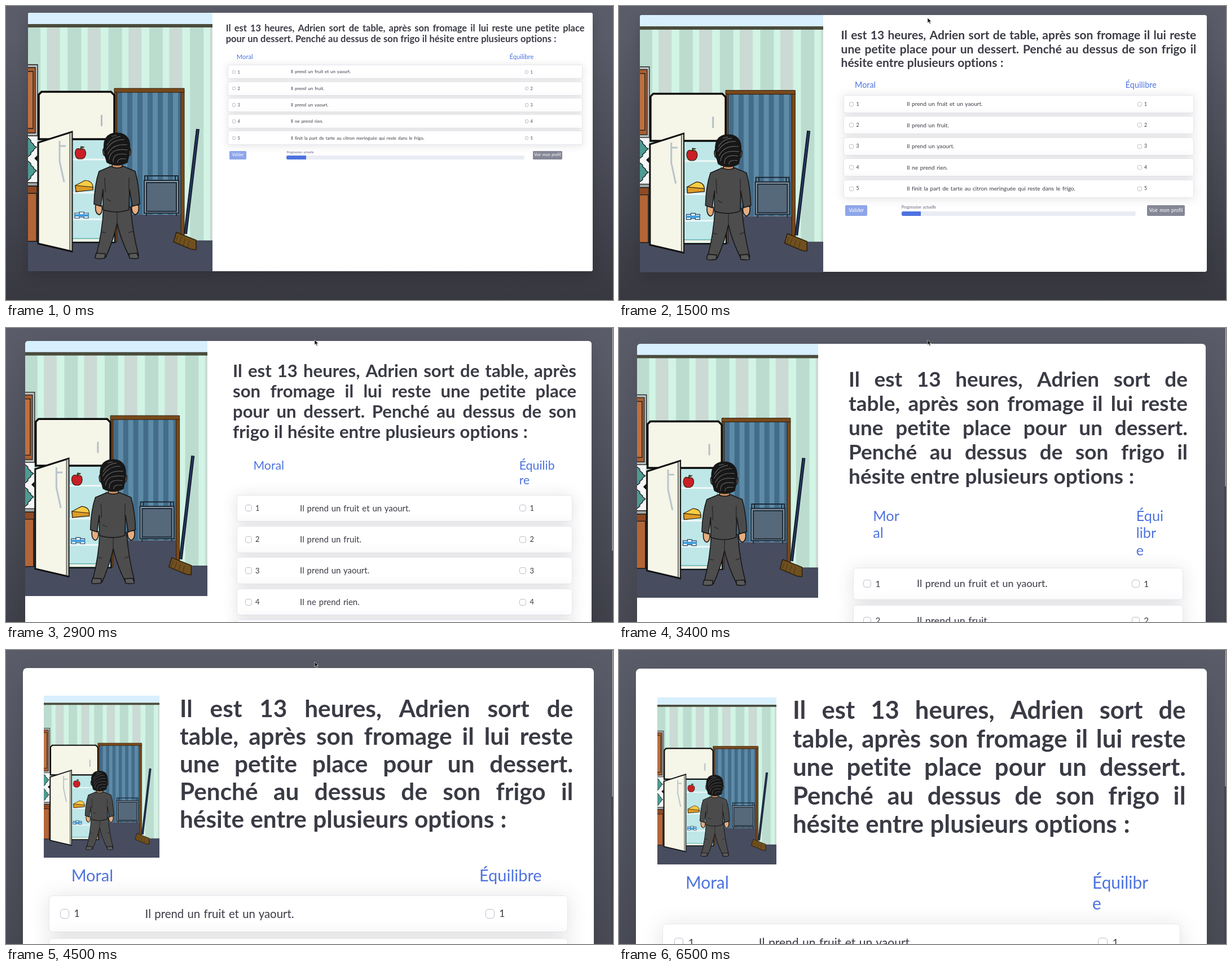
Recreate the animation shown at these times as an HTML page. Size 1076 by 521 pixels, loop 7.6 s.

```html
<!DOCTYPE html>
<html lang="fr">
<head>
<meta charset="utf-8">
<title>Quiz</title>
<style>
html, body { margin: 0; width: 100%; height: 100%; overflow: hidden; }
#stage { position: relative; width: 1076px; height: 521px; overflow: hidden; background: #373840;
  font-family: Lato, "Open Sans", sans-serif; font-variant-ligatures: none; color: #3a3b45; word-spacing: .065em; }
#stage div, #stage svg { position: absolute; box-sizing: border-box; }
.back { background: linear-gradient(#5a5c69 10%, #373840); }
.track { background: #46464e; }
.thumb { background: #929297; border-radius: 2px; }
.card { background: #fff; border-radius: .35em; box-shadow: 0 1em 3em rgba(0,0,0,.175); }
.scene { border-radius: .35em 0 0 0; overflow: hidden; }
.line { font-size: 2.075em; font-weight: 700; display: flex; justify-content: space-between;
  align-items: center; gap: .2em; line-height: 1; margin-top: -.058em; white-space: nowrap; }
.line.last { justify-content: flex-start; gap: .265em; }
.mid { line-height: 0; white-space: nowrap; margin-top: -.05em; }
.head { font-size: 1.42em; color: #4e73df; }
.row { background: #fff; border: .0625em solid #e6e8f0; border-radius: .3em;
  box-shadow: 0 .15em 1.75em rgba(58,59,69,.15); }
.check { border: max(.065em, .7px) solid #bcbdc9; border-radius: .25em; background: #fff; }
.num { font-size: .86em; }
.opt { font-size: 1em; }
.small { font-size: .665em; font-weight: 700; color: #858796; }
.bar { background: #eaecf4; border-radius: .3em; overflow: hidden; }
.fill { background: #4e73df; }
.btn { border-radius: .2em; color: #fff; display: flex; align-items: center; justify-content: center; text-align: center; }
.btn span { font-size: .875em; line-height: 1.4; margin-top: -.06em; }
.ok { background: #8ea5ea; }
.profile { background: #858796; }
.alert { background: #fadbd8; border: 1px solid #f3c4c0; border-radius: 7px; }
.warn { color: #78261f; font-size: 27.3px; }
.warn.big { font-size: 37.6px; font-weight: 700; }
</style>
</head>
<body>
<svg width="0" height="0" style="position:absolute">
<defs>
  <pattern id="wall" x="-2" width="72.3" height="9" patternUnits="userSpaceOnUse">
    <path fill="#d1f4e5" d="M0 0h73v9H0z"/><path fill="#bbdccf" d="M0 0h24v9H0z"/><path fill="#cbdad4" d="M35.5 0h23v9h-23z"/>
  </pattern>
  <pattern id="blue" x="158" width="18" height="9" patternUnits="userSpaceOnUse">
    <path fill="#5d8ba8" d="M0 0h18v9H0z"/><path fill="#436c89" d="M0 0h9v9H0z"/>
  </pattern>
  <symbol id="kitchen" viewBox="0 0 327 458" preserveAspectRatio="none">
    <path fill="#d8effd" d="M0 0h327v21H0z"/>
    <path fill="url(#wall)" d="M0 25h327v380H0z"/>
    <path fill="#4a4c3c" d="M0 20h327v6H0z"/>
    <path fill="#474c5f" d="M0 404h327v54H0z"/>
    <path stroke="#343849" d="M276 404h51"/>
    <!-- doorway -->
    <path fill="url(#blue)" d="M156 140h116v218H156z"/>
    <path fill="#474c5f" d="M154 358h118v50H154z"/>
    <g fill="#78491b" stroke="#2e1d0a"><path d="M271 140h6v265h-6zM153.500 140h4v266h-4z"/><path d="M153 134h124v7H153z"/></g>
    <g fill="none" stroke="#1c2936" stroke-width="2"><path d="M207 289h59v10h-59zM212 289v10M261 289v10"/>
      <path fill="#8b9aa6" d="M206 297h61v58h-61z"/><path fill="#56697a" d="M210 301h53v51h-53z"/><path d="M210 355v5M263 355v5"/></g>
    <!-- broom -->
    <path d="M301 206 279 392" stroke="#0e1422" stroke-width="6"/><path d="M301 207 279 392" stroke="#25365d" stroke-width="3"/>
    <path fill="#70501f" stroke="#2b1e0a" stroke-width="1.500" d="m263 389 35 14 0 17-9-1-31-13z"/>
    <path fill="none" stroke="#4a3410" d="m266 395-4 11m10-9-4 12m11-9-4 13m11-10-3 12"/>
    <!-- cupboards -->
    <path fill="#f4f6f5" d="M0 218h16v84H0z"/>
    <g stroke="#16191a" stroke-width="1.300"><path fill="#4d9b92" d="M-2 222h2l5 4v3l5 4v2l5 3-5 4v2l-5 4v3l-5 4h-2zM-2 263h2l5 4v3l5 4v2l5 4-5 4v2l-5 4v3l-5 4h-2z"/>
      <path d="M16 254l-4 4 4 4z"/>
      <path fill="#b9bcb9" d="M-2 92h19v126H-2z"/><path fill="#a95e31" d="M-2 97h15v116H-2z"/><path fill="#bd7040" d="M-2 104h11v101H-2z"/>
      <path fill="#8d4b25" d="M-2 307h18v98H-2z"/><path fill="#b36537" d="M-2 320h17v85H-2z"/><path fill="#a0a6a6" d="M-2 301h19v6H-2z"/></g>
    <!-- fridge -->
    <path fill="#bfe7e8" stroke="#111" stroke-width="2.500" d="M70 222h84v185H70z"/>
    <path fill="none" stroke="#f3f3e4" stroke-width="4" d="M148 227v176H78"/><path stroke="#3a9d98" d="M145 228v172H78" fill="none"/>
    <path stroke="#eef7f8" stroke-width="3" d="M78 260h67M78 319h67M78 366h67"/>
    <path fill="#f5f5e8" stroke="#0c0c0c" stroke-width="3.500" d="M24 140h123l6 6v78H19v-79z"/>
    <path stroke="#b4bec5" stroke-width="3" d="M130.500 181v20"/>
    <path fill="#f5f5e8" stroke="#111" stroke-width="3" d="M18 230 78 211V423L18 409z"/>
    <path fill="#c9cbbb" stroke="#222" d="M74 213l4-1v210l-4-1z"/>
    <path fill="none" stroke="#b9c4ca" stroke-width="3" d="M56 227v36l8 37M56 236h11"/>
    <g stroke="#321" stroke-width="1.200">
      <path fill="#c91f26" d="M93 242c-12-7-12 16-3 17h6c9-2 9-22-3-17z"/><path fill="#4b9b34" d="m93 241 1-4 5 1z"/>
      <path fill="#f8cc45" d="m84 306 17-9q13 1 14 11v5l-30 4z"/><path fill="#dd9c27" d="m84 306 31 3v5l-30 3z"/>
      <g fill="#eef8ff" stroke="#246"><path d="M83 355h8v9h-8zM91 353h8v9h-8zM99 355h8v9h-8z"/></g>
    </g>
    <path stroke="#3c9ce0" stroke-width="4" d="M83 359h24"/>
    <!-- man seen from behind -->
    <g stroke="#171717" stroke-width="1.600" stroke-linejoin="round">
      <path fill="#e5ad80" d="M120 340q-2 15 6 18 7-3 5-16zM184 340q-2 14 6 18 8-3 6-17z"/>
      <path fill="#4d4d4d" d="M134 344Q132 388 121 430l17 3q14-32 20-60 6 28 22 60l16-3q-11-42-14-86z"/>
      <path fill="#5a5a5a" d="m121 426-2 8q2 3 17 1l1-8zM179 427l1 8q14 2 16-1l-3-8z"/>
      <path fill="#4b4b4b" d="M147 272q10 4 22 0l21 9q7 25 8 58l-13 4-5-30-1 36q-22 8-46 0v-36l-4 30-12-4q1-35 9-58z"/>
      <path fill="none" stroke="#2d2d2d" d="M136 292l1 26M179 292l0 26M158 372v-18M139 330l8 4M129 388l9 2M178 390l8-3"/>
      <path fill="#c98d5f" d="M136 240q-5 0-2 12l5 4zM179 240q5 0 2 12l-5 4z"/>
      <path fill="#c98d5f" d="M149 264h18v9q-9 4-18 0z"/>
      <path fill="#171717" d="M136 251q-7-38 22-38 28 1 21 38l-3 14q-18 10-36 0z"/>
    </g>
    <g fill="none" stroke="#606060" stroke-width="1.200">
      <path d="M140 235q7-14 24-16M139 243q10-19 32-18M141 251q9-20 35-17M144 260q1-21 33-17M151 265q-2-18 24-14M159 266q-1-9 15-7M148 219l9-2"/>
    </g>
  </symbol>
  <symbol id="guy" viewBox="0 0 1076 521">
    <g stroke="#0d0d0d" stroke-width="5" stroke-linejoin="round">
      <path fill="#e2ab78" d="M62 508q-12 5-14 18h36l-4-9z"/>
      <path fill="#666" d="M236 380 204 393Q137 422 100 453 68 481 58 506l20 18 12-2Q112 488 136 475L206 456V530H350l-5-18 12 18h46Q390 470 377 416L314 380z"/>
      <path fill="#fff" d="M240 376 247 440 246 530H305V440L310 376z" stroke="none"/>
      <path fill="#e2ab78" stroke="#b8b8b8" stroke-width="3" d="M249 376q3 38 26 54 25-17 30-54z"/>
      <path fill="#fff" stroke="#ababab" stroke-width="4" d="M241 379q5 38 24 55l10-6q-20-17-27-50zM310 379q-6 38-25 55l-10-6q20-17 27-50z"/>
      <path fill="none" stroke="#adadad" stroke-width="4" d="M265 434v90M285 434v90"/>
      <path fill="none" stroke="#999" stroke-width="3" stroke-dasharray="7 9" d="M275 442v80"/>
      <path fill="#666" stroke-width="6" d="M238 378l-20 35 8 9-12 12 29 51 3 45V440zM312 378l22 36-9 9 14 12-32 52-2 43V440z"/>
      <path fill="none" d="M206 430v92M342 520q-5-50 6-78"/>
    </g>
    <path fill="none" stroke="#454545" stroke-width="4" d="M170 425l-18 37M122 445l-4 26M190 420l-9 32M88 475l12 17M372 440l-20 28M380 468l-21 25M386 495l-17 14"/>
    <g stroke="#0d0d0d" stroke-width="5" stroke-linejoin="round">
      <path fill="#a66b38" d="M213 289h-6q-4 19 3 30h7zM335 289h8q4 18-3 30h-8z"/>
      <path fill="#f1be8c" d="M212 260Q209 308 217 325L239 368Q248 381 275 381 301 381 311 368L333 325Q340 308 336 260 320 215 275 218 220 220 212 260z"/>
    </g>
    <path fill="#c4864c" d="M215 262q15-8 17 16l-2 34 10 36 8 24-12-12-17-35q-6-25-4-63zM333 262q-14-8-16 16l2 34-10 36-7 24 12-12 17-35q5-25 2-63z"/>
    <path fill="#b5763f" d="M220 284h47l-5 26q-20 8-37 0zM282 284h47l-6 26q-18 8-36 0z"/>
    <path fill="#d99f69" d="M240 358q34 10 70 0l-9 17q-27 7-52 0z"/>
    <path fill="#1c1c1c" stroke="#080808" stroke-width="4" d="M207 290Q199 232 217 211 240 196 275 195 313 196 334 213 350 237 342 290L333 268Q330 245 312 234 294 248 272 246 251 245 239 235 221 248 218 274z"/>
    <path fill="none" stroke="#5c5c5c" stroke-width="5" d="M213 262q5-24 18-32M219 230q8-17 22-20M240 212q3 17 20 24M257 204q2 18 21 29M277 203q2 15 15 26M296 205q1 12 12 20M317 213q17 12 19 45M212 276q2-16 11-28M338 276q0-14-6-24"/>
    <g fill="none" stroke="#bd8350" stroke-width="3"><path d="M243 263q32-7 64 0M251 273q25-4 50 0M252 317q-13 7-14 22M297 317q14 7 15 22M240 343l-3 13M310 343l3 13M265 370h21"/></g>
    <path fill="#dbe6e6" d="M229 302q17-14 33 2-17 13-33-2zM287 304q16-17 33-2-15 14-33 2z"/>
    <g fill="#3f8398"><circle cx="245" cy="301" r="8"/><circle cx="301" cy="301" r="8"/></g>
    <circle cx="245" cy="302" r="3.500"/><circle cx="301" cy="302" r="3.500"/>
    <path d="M220 287q12-17 26-9l23 7-2 6-23-3q-13-3-24 3zM329 287q-12-17-26-9l-21 7 2 6 22-3q12-3 23 3z" fill="#0d0d0d"/>
    <g fill="none" stroke="#1b130d" stroke-width="5" stroke-linecap="round"><path d="M226 297q18-8 36 4M287 301q17-12 35-4M261 330q4 5 9 3 6 5 11 0 5 2 7-3M248 355q2-6 12-6h30q10 0 11 6"/></g>
  </symbol>
</defs>
</svg>
<div id="stage"><div id="page"></div>
<svg id="cursor" width="10" height="14" style="left:546px"><path d="M1 1v9l2.200-2 1.600 3.600 1.500-.7-1.500-3.400h3z" fill="#111" stroke="#ddd" stroke-width=".7"/></svg>
</div>
<script>
const LOOP = 7600;
const words = 'Il est 13 heures, Adrien sort de table, après son fromage il lui reste une petite place pour un dessert. Penché au dessus de son frigo il hésite entre plusieurs options :'.split(' ');
const options = ['Il prend un fruit et un yaourt.', 'Il prend un fruit.', 'Il prend un yaourt.', 'Il ne prend rien.',
  'Il finit la part de tarte au citron meringuée qui reste dans le frigo.'];

// rem: root size; breaks: first word of each further line; thumb: scrollbar length
const five = [7, 14, 20, 27], wider = [8, 15, 21, 29];
const narrowWrap = { rem: 21.05, breaks: five, thumb: 242, narrow: true, right: 'Équilibr|e' };
const states = [
  { at: 0, rem: 7.93, breaks: [17] },
  { at: 1300, rem: 9, breaks: [15, 29] },
  { at: 1500, rem: 10.14, breaks: [14, 27] },
  { at: 1800, rem: 11.3, breaks: [12, 22] },
  { at: 2100, rem: 12.3, breaks: [10, 20, 30], thumb: 505 },
  { at: 2900, rem: 15, breaks: [9, 17, 25], thumb: 395, right: 'Équilib|re' },
  { at: 3100, rem: 16.2, breaks: wider, thumb: 345, right: 'Équili|bre' },
  { at: 3400, rem: 17.83, breaks: five, thumb: 281, left: 'Mor|al', right: 'Équi|libr|e' },
  { at: 3700, rem: 19.3, breaks: wider, thumb: 272, narrow: true },
  { at: 4500, rem: 20.4, breaks: five, thumb: 260, narrow: true },
  { at: 4800, ...narrowWrap },
  { at: 5200, rem: 22.5, thumb: 256, warning: true },
  { at: 5800, ...narrowWrap },
];

const box = (cls, x, y, w, h, html = '') =>
  `<div class="${cls}" style="left:${x}px;top:${y}px;width:${w}px;height:${h}px">${html}</div>`;
const text = (cls, x, y, str) => `<div class="mid ${cls}" style="left:${x}px;top:${y}px">${str}</div>`;
function art(id, cls, ...rect) {
  const [x, y, w, h] = rect.map(Math.round);
  return `<svg class="${cls}" style="left:${x}px;top:${y}px" width="${w}" height="${h}"><use href="#${id}" width="${w}" height="${h}"/></svg>`;
}

function warning() {
  return box('alert', 47, 54, 978, 122)
    + text('warn big', 71, 90, "Ce jeu n'est pas adapté à votre support")
    + text('warn', 71, 137, 'Veuillez utiliser un ordinateur ou une tablette en mode paysage.')
    + art('guy', '', 0, 0, 1076, 521);
}

function title(breaks, x, y, w, lh) {
  const cuts = [0, ...breaks, words.length];
  return cuts.slice(1).map((end, i) => {
    const spans = words.slice(cuts[i], end).map(v => `<span>${v}</span>`).join(' ');
    return box(end === words.length ? 'line last' : 'line', x, y + i * lh, w, lh, spans);
  }).join('');
}

function rows(x, y, w, s) {
  return options.map((opt, i) => {
    const top = y + i * 3.69 * s, mid = top + 1.585 * s;
    const check = cx => box('check', cx - .4 * s, mid - .4 * s, .8 * s, .8 * s) + text('num', cx + .81 * s, mid, i + 1);
    return box('row', x, top, w, 3.17 * s) + check(x + 1.38 * s)
      + text('opt', x + w / 6 + .85 * s, mid, opt) + check(x + w * 5 / 6 + .74 * s);
  }).join('');
}

function controls(x, y, w, s, two) {
  const barX = x + w / 6 - .1 * s, barW = .67 * w;
  return box('btn ok', x + .3 * s, y, 3.82 * s, 1.9 * s, '<span>Valider</span>')
    + text('small', barX, y + .36 * s, 'Progression actuelle')
    + box('bar', barX, y + 1.12 * s, barW, .8 * s, box('fill', 0, 0, barW / 12, .8 * s))
    + box('btn profile', x + w * 5 / 6 + 2.05 * s, y, (two ? 5.8 : 6.57) * s, (two ? 3.1 : 1.9) * s,
      `<span>Voir mon${two ? '<br>' : ' '}profil</span>`);
}

function build({ rem: s, breaks, thumb, narrow, left = 'Moral', right = 'Équilibre', warning: warn }) {
  const x = 39 - (s - 7.9) * .72, y = 1.6 * s - .7, end = (thumb ? 1072 : 1079) - x;
  let html = box('back', 0, 0, 1076, thumb ? 521 * 521 / thumb : 521);
  if (thumb) html += box('track', 1073, 0, 3, 521) + box('thumb', 1074, 0, 2, thumb);
  if (warn) return html + box('card', x, y, end - x, 900) + warning();

  const top = y + 2.4 * s, lh = 2.4 * s;
  const imgW = narrow ? 10.03 * s : 331 - .55 * s, imgH = 1.401 * imgW;
  const img = narrow ? [x + 1.81 * s, top, imgW, imgH] : [x, y, imgW, imgH];
  const rowX = narrow ? x + 2.25 * s : x + imgW + 3.5 * s, rowW = end - 2.25 * s - rowX;
  const titleX = narrow ? 308 : rowX - .47 * s, titleW = rowX + rowW + .45 * s - titleX;
  const heads = [left.split('|'), right.split('|')];
  const headH = 1.72 * s, count = Math.max(heads[0].length, heads[1].length);
  const headY = narrow ? top + imgH + 1.6 * s : top + (breaks.length + 1) * lh + 2.72 * s;
  const rowY = headY + count * headH, ctrlY = rowY + 19.2 * s;
  const two = rowW / 6 - 2.35 * s < 6.3 * s;
  const bottom = Math.max(y + imgH, ctrlY + (two ? 3.9 : 2.7) * s);
  const headX = [rowX + 1.95 * s, narrow ? 839 : 873 + 2.45 * s];

  return html + box('card', x, y, end - x, bottom - y)
    + art('kitchen', narrow ? '' : 'scene', ...img)
    + title(breaks, titleX, top, titleW, lh)
    + heads.map((parts, c) => parts.map((p, i) => text('head', headX[c], headY + i * headH, p)).join('')).join('')
    + rows(rowX, rowY, rowW, s) + controls(rowX, ctrlY, rowW, s, two);
}

const page = document.getElementById('page'), cursor = document.getElementById('cursor');
let shown;
function draw(now) {
  const t = now % LOOP, state = states.findLast(v => t >= v.at);
  if (state !== shown) {
    shown = state;
    page.style.fontSize = state.rem + 'px';
    page.innerHTML = build(state);
  }
  const step = Math.min(6, Math.floor((t - 500) / 100));
  cursor.style.top = 9 + step * 11 / 6 + 'px';
  cursor.style.opacity = t < 500 || t >= 6500 ? 0 : t < 6300 ? 1 : .5;
  requestAnimationFrame(() => draw(performance.now()));
}
draw(performance.now());
</script>
</body>
</html>
```
